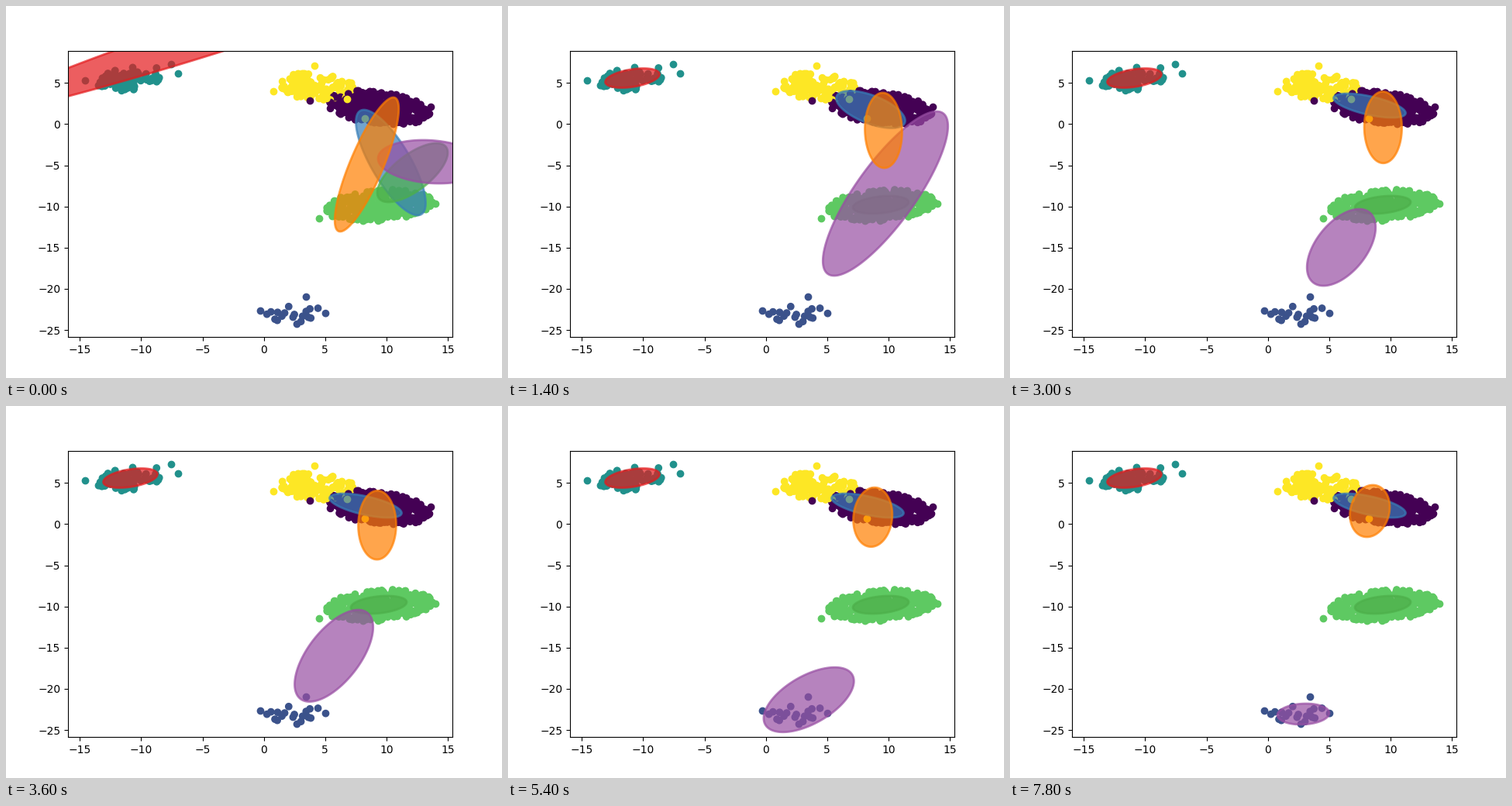
Write a matplotlib script that moves like this. It is 640 px wide and 480 px high and loops after 8 s.

```python
import numpy as np
import matplotlib.pyplot as plt
from matplotlib.animation import FuncAnimation
from matplotlib.patches import Polygon

FRAMES, STEP_MS = 40, 200
X_LIM, Y_LIM = (-15.97, 15.39), (-25.86, 8.92)
LEFT, RIGHT, TOP, BOTTOM = 80, 576, 57.6, 427.2

rng = np.random.default_rng(11)
fig, ax = plt.subplots(figsize=(6.4, 4.8), dpi=100)
ax.set(xlim=X_LIM, ylim=Y_LIM)


def to_data(x, y):
    """Stage pixels (y down, addressed by pixel centre) to data coordinates."""
    u = (np.asarray(x) + 0.5 - LEFT) / (RIGHT - LEFT)
    v = (BOTTOM - np.asarray(y) - 0.5) / (BOTTOM - TOP)
    return np.column_stack([X_LIM[0] + u * (X_LIM[1] - X_LIM[0]),
                            Y_LIM[0] + v * (Y_LIM[1] - Y_LIM[0])])


def tilt(angle, cx, cy, hx, hy, r):
    """Point on an ellipse given by centre, half extents and correlation."""
    lean = r * np.cos(angle) + np.sqrt(1 - r * r) * np.sin(angle)
    return cx + hx * np.cos(angle), cy + hy * lean


def cloud(n, cx, cy, hx, hy, r):
    """Random points inside a tilted ellipse, denser towards the middle."""
    reach = rng.random(n) ** 0.6
    return np.column_stack(tilt(rng.uniform(0, 2 * np.pi, n),
                                cx, cy, hx * reach, hy * reach, r))


clouds = [cloud(320, 480, 130.5, 67, 22, 0.3),    # dark purple
          cloud(18, 373, 397, 44, 12, 0.1),       # navy
          cloud(75, 160, 93, 44, 18, -0.4),       # teal
          cloud(300, 481, 257, 70, 20.5, -0.25),  # green
          cloud(115, 402, 104, 51, 19, 0.25)]     # yellow
# The few far-out points, by cloud
strays = [[(392, 122), (548, 130)], [(387, 375), (328, 393), (375, 410)],
          [(102, 96), (222, 87), (213, 75)], [(404, 274), (554, 255)],
          [(345, 110), (398, 77), (463, 145), (440, 120)]]

labels = np.repeat(np.arange(5), [len(c) for c in clouds])
order = rng.permutation(len(labels))
stray_labels = np.repeat(np.arange(5), [len(s) for s in strays])
points = np.vstack([np.vstack(clouds)[order]] + strays)
ax.scatter(*to_data(*points.T).T, c=np.append(labels[order], stray_labels),
           cmap="viridis")

# Key poses by frame: centre x, centre y, half width, half height, correlation
red = {0: (341, 13, 381, 126, -0.98), 2: (181, 79, 56, 30.5, -0.72),
       7: (160, 92.5, 35, 12.5, -0.4)}
blue = {0: (496, 201.5, 45, 68, 0.77), 2: (470.5, 190, 59, 250, 0.574),
        7: (467.5, 133, 44.5, 24, 0.6), 15: (463.5, 128, 46.5, 15.5, 0.62)}
green = {0: (524, 214.5, 45.5, 38, -0.68), 2: (496, 234.5, 39.5, 40, -0.85),
         7: (480.5, 256, 36, 11.5, -0.3)}
purple = {0: (548, 200.5, 68.5, 28, 0.15), 2: (518.5, 202, 53, 50.3, -0.46),
          7: (486.5, 241.5, 80.7, 106, -0.82), 12: (476, 272, 91, 134, -0.85),
          13: (470, 250, 108, 195, -0.8), 15: (427, 311, 44.3, 49.5, -0.52),
          23: (413, 345, 64.3, 80.3, -0.84), 25: (391, 372, 66, 51, -0.74),
          31: (378, 397, 36, 15.5, -0.1), 39: (378, 397, 33.5, 13.5, -0.1)}
orange = {0: (465, 204, 41.3, 86.5, -0.83), 2: (472.5, 191.5, 29, 33, 0.05),
          7: (484, 160, 24, 48.5, 0.04), 39: (463.8, 135, 25.7, 33.5, -0.15)}

turn = np.linspace(0, 2 * np.pi, 181)


def pose(keys, frame):
    """Ease smoothly from one key pose to the next, then hold the last."""
    start = max(k for k in keys if k <= frame)
    end = min((k for k in keys if k > frame), default=start)
    p = (frame - start) / max(end - start, 1)
    p = p * p * (3 - 2 * p)
    return np.array(keys[start]) * (1 - p) + np.array(keys[end]) * p


def outline(keys, frame):
    return to_data(*tilt(turn, *pose(keys, frame)))


tracks = [red, blue, green, purple, orange]
ellipses = [ax.add_patch(Polygon(outline(keys, 0), closed=True, color=color,
                                 alpha=0.7, lw=2, zorder=2))
            for keys, color in zip(tracks, plt.get_cmap("Set1").colors)]


def draw(frame):
    for ellipse, keys in zip(ellipses, tracks):
        ellipse.set_xy(outline(keys, frame))
    return ellipses


anim = FuncAnimation(fig, draw, frames=FRAMES, interval=STEP_MS,
                     repeat=True, repeat_delay=0)
plt.show()
```
